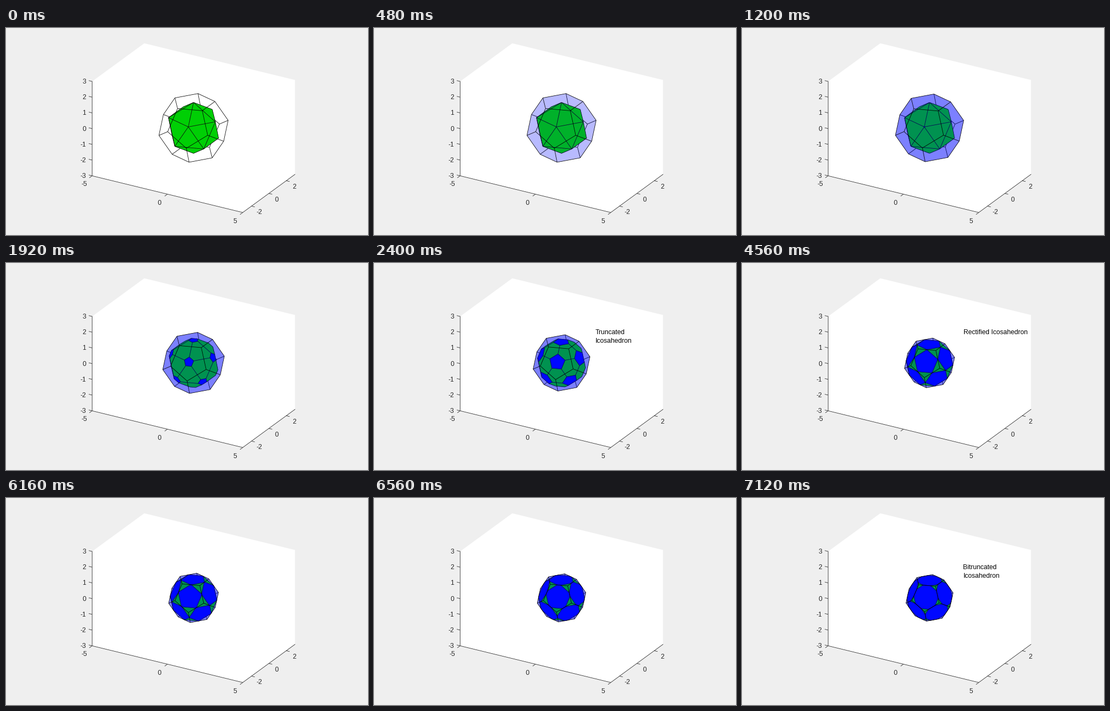
Animation, 670 px wide and 384 px high, one loop 8 s. Source, as a matplotlib script:

```python
import itertools

import matplotlib.pyplot as plt
import numpy as np
from matplotlib.animation import FuncAnimation
from matplotlib.collections import LineCollection, PolyCollection

W, H, DPI = 670, 384, 100
PX = 72 / DPI
FRAMES, INTERVAL = 100, 80
SCALE, ORIGIN = 32.2, np.array([346.6, 184.8])
AZIM, ELEV = np.radians([30, 25])
RADIUS = 1.618
GREEN, BLUE, INK = "#00cf05", (0, 0.03, 1), "#262626"
FACE_ALPHA = 0.3
LINE = 0.8 * PX

plt.rcParams["font.family"] = "Liberation Sans"

ca, sa, ce, se = np.cos(AZIM), np.sin(AZIM), np.cos(ELEV), np.sin(ELEV)
SCREEN = np.array([[ca, sa, 0], [sa * se, -ca * se, -ce]])
VIEW = np.array([sa * ce, -ca * ce, se])


def project(points):
    return ORIGIN + SCALE * np.asarray(points, float) @ SCREEN.T


def lerp(a, b, t):
    return a + t * (b - a)


def around(axis, points):
    """Indices of points sorted by angle around an axis."""
    u = np.cross(axis, points[0])
    v = np.cross(axis, u)
    return np.argsort(np.arctan2(points @ v, points @ u))


# Icosahedron with a vertex on the z axis
ring = np.radians(72) * np.arange(5)


def make_ring(shift, z):
    return np.column_stack([2 * np.cos(ring + shift), 2 * np.sin(ring + shift),
                            np.full(5, z)]) / np.sqrt(5)


UNIT = np.vstack([[0, 0, 1], make_ring(0, 1), make_ring(np.pi / 5, -1), [0, 0, -1]])
VERTS = RADIUS * UNIT
ADJACENT = np.abs(UNIT @ UNIT.T - 1 / np.sqrt(5)) < 1e-6
NEIGHBOURS = []
for i in range(12):
    near = np.flatnonzero(ADJACENT[i])
    NEIGHBOURS.append(near[around(UNIT[i], VERTS[near])])
TRIANGLES = [t for t in itertools.combinations(range(12), 3)
             if all(ADJACENT[a, b] for a, b in itertools.combinations(t, 2))]

# Dual dodecahedron: one vertex per triangle, one face per icosahedron vertex
NORMALS = np.array([UNIT[list(t)].sum(axis=0) for t in TRIANGLES])
NORMALS /= np.linalg.norm(NORMALS, axis=1)[:, None]
INRADIUS = NORMALS[0] @ UNIT[TRIANGLES[0][0]]
DUAL_COS = np.sqrt(5) / 3
DUAL_NEAR = [np.flatnonzero(np.abs(NORMALS @ n - DUAL_COS) < 1e-6) for n in NORMALS]
DUAL_FACES = []
for i in range(12):
    owners = np.array([k for k, t in enumerate(TRIANGLES) if i in t])
    DUAL_FACES.append(owners[around(UNIT[i], NORMALS[owners])])


def cut_both_ends(loop, t):
    """Points at t and 1 - t on every side of a closed loop."""
    return np.array([p for a, b in zip(loop, np.roll(loop, -1, axis=0))
                     for p in (lerp(a, b, t), lerp(b, a, t))])


def solid_faces(t, dual, distance):
    """Green and blue faces of the icosahedron cut by the dual's planes."""
    if t <= 0.5:
        green = [cut_both_ends(VERTS[list(tri)], t) for tri in TRIANGLES]
        blue = [lerp(VERTS[i], VERTS[NEIGHBOURS[i]], t) for i in range(12)] if t else []
    else:
        s = (1 - INRADIUS ** 2 * RADIUS / distance) / (1 - DUAL_COS)
        green = [lerp(dual[k], dual[DUAL_NEAR[k]], s) for k in range(20)]
        blue = [cut_both_ends(dual[f], s) for f in DUAL_FACES]
    return green, blue


def unique_edges(faces):
    """Every side of the flat faces once, keyed by its rounded ends."""
    edges = {}
    for face in faces:
        for a, b in zip(face, np.roll(face, -1, axis=0)):
            key = frozenset(tuple(np.round(p, 3) + 0.0) for p in (a, b))
            if len(key) == 2:
                edges[key] = (a, b)
    return edges


def count_steps(frame, start, stop):
    """Steps taken so far; motion rests on every fifth frame."""
    return sum(n % 5 != 3 for n in range(start, min(frame + 1, stop)))


def caption_lines(frame):
    if 30 <= frame < 50:
        return "Truncated", "Icosahedron"
    if 57 <= frame < 77:
        return "Rectified Icosahedron", ""
    if frame >= 89:
        return "Bitruncated", "Icosahedron"
    return "", ""


fig = plt.figure(figsize=(W / DPI, H / DPI), dpi=DPI, facecolor="#efefef")
ax = fig.add_axes([0, 0, 1, 1])
ax.set_xlim(-0.5, W - 0.5)
ax.set_ylim(H - 0.5, -0.5)
ax.axis("off")


def label(x, y, text, **style):
    style = {"ha": "center", "va": "baseline", "color": INK, **style}
    return ax.text(x, y, text, fontsize=12.2 * PX, **style)


def draw_box():
    outline = [(-5, -3, 3), (-5, 3, 3), (5, 3, 3), (5, 3, -3), (5, -3, -3), (-5, -3, -3)]
    ax.add_patch(plt.Polygon(project(outline), fc="white", ec="none"))
    ax.plot(*project([outline[0], outline[5], outline[4], outline[3]]).T,
            color=INK, lw=LINE, solid_joinstyle="miter", snap=False)
    ticks = []

    def tick(point, direction):
        p = project(point)
        step = SCREEN @ direction
        ticks.append([p, p + 6.3 * step / np.hypot(*step)])
        return p

    for z in range(-3, 4):
        x, y = tick((-5, -3, z), (-1, 0, 0))
        label(x - 11.3, y + 4, str(z), ha="right")
    for v in (-5, 0, 5):
        x, y = tick((v, -3, -3), (0, -1, 0))
        label(x - 14.7, y + 19.3, str(v))
    for v in (-2, 0, 2):
        x, y = tick((5, v, -3), (1, 0, 0))
        label(x + 14.8, y + 14.8, str(v))
    ax.add_collection(LineCollection(ticks, colors=INK, linewidths=LINE))
    ax.plot([-1, W], [H - 1, H - 1], color="#8a8a8a", lw=PX)


def add_layer(zorder):
    fills = PolyCollection([], edgecolors="none", linewidths=0, zorder=zorder)
    edges = LineCollection([], colors="black", linewidths=LINE, zorder=zorder + 0.5)
    ax.add_collection(fills)
    ax.add_collection(edges)
    return fills, edges


draw_box()
back_layer, solid_layer, front_layer = (add_layer(z) for z in (3, 4, 5))
captions = [label(409, y, "", ha="left", color="black") for y in (132, 147)]


def fill_layer(layer, faces, colors, edges):
    layer[0].set_verts(faces)
    layer[0].set_facecolor(colors)
    layer[1].set_segments(list(edges.values()))


def update(frame):
    alpha = FACE_ALPHA * count_steps(frame, 1, 13) / 10
    t = (0.025 * (count_steps(frame, 15, 31) + count_steps(frame, 50, 58))
         + 0.008 * count_steps(frame, 77, 90))
    distance = RADIUS * (1 - t * (1 - 1 / np.sqrt(5)))
    dual = NORMALS * distance / INRADIUS
    shell = [dual[f] for f in DUAL_FACES]

    def facing(faces, sign=1):
        return [project(f) for f in faces if sign * (f.mean(axis=0) @ VIEW) > 0]

    green, blue = map(facing, solid_faces(t, dual, distance))
    front, back = facing(shell), facing(shell, -1)
    front_edges = unique_edges(front)
    hidden_edges = {k: e for k, e in unique_edges(back).items() if k not in front_edges}

    fill_layer(back_layer, back, (*BLUE, alpha), hidden_edges)
    fill_layer(solid_layer, green + blue, [GREEN] * len(green) + [BLUE] * len(blue),
               unique_edges(green + blue))
    fill_layer(front_layer, front, (*BLUE, alpha), front_edges)
    for item, text in zip(captions, caption_lines(frame)):
        item.set_text(text)
    return [*back_layer, *solid_layer, *front_layer, *captions]


anim = FuncAnimation(fig, update, frames=FRAMES, interval=INTERVAL, repeat=True,
                     repeat_delay=0, blit=False)
plt.show()
```
